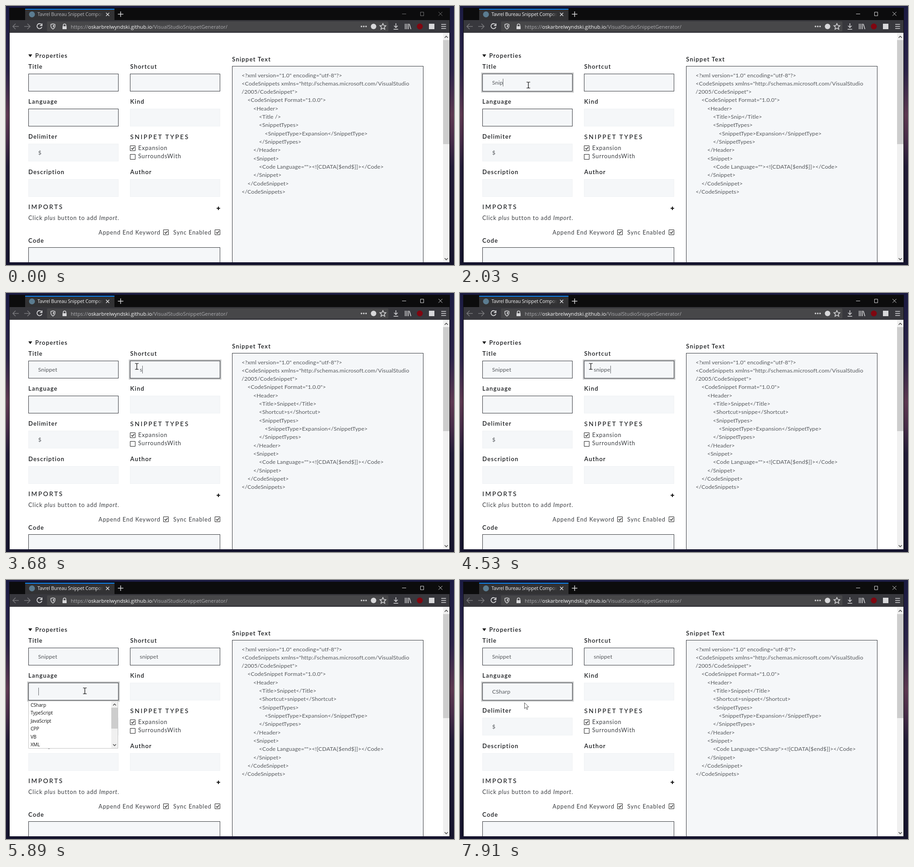
Write an HTML page that moves like this. It is 983 px wide and 570 px high and loops after 7.99 s.

```html
<!DOCTYPE html>
<html lang="en">
<head>
<meta charset="utf-8">
<title>Snippet form</title>
<style>
  html, body { margin: 0; width: 100%; height: 100%; overflow: hidden; background: #14132b; }
  svg { display: block; width: 983px; height: 570px; }
  text { font: 12.35px Lato, sans-serif; letter-spacing: .11px; fill: #55585c; white-space: pre; }
  .label { font-size: 13px; font-weight: 600; letter-spacing: 1.2px; fill: #17191c; }
  .head { font-size: 13.6px; font-weight: 500; letter-spacing: 2.55px; fill: #17191c; }
  .note { font-size: 12.6px; letter-spacing: .88px; fill: #3a3d41; }
  .ui { font: 11.2px "Open Sans", sans-serif; letter-spacing: 0; fill: #adadb0; }
  .tab { font-size: 10.4px; letter-spacing: -.15px; }
  .option { font-size: 10.4px; letter-spacing: -.2px; fill: #111; }
  .icon { fill: none; stroke: #d8d8da; stroke-width: 1.5; }
  .thin { fill: none; stroke: #222; stroke-width: 1; }
</style>
</head>
<body>
<svg viewBox="0 0 983 570">
  <defs>
    <linearGradient id="sky" x2="0" y2="1">
      <stop offset="0" stop-color="#1b1b42"/><stop offset=".25" stop-color="#2a2348"/>
      <stop offset=".42" stop-color="#5c3850"/><stop offset=".52" stop-color="#452b47"/>
      <stop offset=".62" stop-color="#221c37"/><stop offset="1" stop-color="#15142d"/>
    </linearGradient>
    <linearGradient id="tabFade">
      <stop offset="0" stop-color="#323234" stop-opacity="0"/><stop offset="1" stop-color="#323234"/>
    </linearGradient>
    <clipPath id="page"><path d="M8 59H973V564H8Z"/></clipPath>
  </defs>
  <path fill="url(#sky)" d="M0 0H983V570H0Z"/>
  <path fill="#0c0c0d" d="M7 4H974V564H7Z"/>
  <path fill="#323234" d="M42 6H238V31H42Z"/>
  <path fill="#0a84ff" d="M42 6H238V8H42Z"/>
  <path fill="#38383d" d="M8 31H973V59H8Z"/>
  <path fill="#474749" d="M92 34H837Q839 34 839 36V54Q839 56 837 56H92Q90 56 90 54V36Q90 34 92 34Z"/>
  <circle cx="57" cy="18.500" r="6.500" fill="#5b7c90"/>
  <text id="tabTitle" class="ui tab" x="69" y="22">Tavrel Bureau Snippet Composer</text>
  <path fill="url(#tabFade)" d="M198 9H213V30H198Z"/><path fill="#323234" d="M213 9H238V30H213Z"/>
  <path class="icon" d="M219.500 15l7 7m0-7l-7 7M251.500 12v12M245.500 18h12"/>
  <g id="controls" class="icon" style="stroke-width:1">
    <path d="M869 17.500h9M909.500 13.500h7v8h-7zM949 13l8.500 8.500m0-8.500l-8.500 8.500"/>
  </g>
  <path class="icon" style="stroke:#77777b" d="M28 45H15m6-6l-6 6 6 6M40 45h13m-6-6l6 6-6 6"/>
  <path class="icon" style="stroke-width:1.800" d="M78 41a5.500 5.500 0 1 0 .8 5M79 38.500v4.500h-4.500"/>
  <path class="icon" d="M98.500 40.500l4.500-1.300 4.500 1.300v3.500q0 4-4.500 6.800-4.500-2.800-4.500-6.800z"/><path fill="#d8d8da" d="M103 42h2.500v2q0 2-2.500 3.500z"/>
  <path class="icon" d="M125.500 45v-2.500a3 3 0 0 1 6 0v2.500"/><path fill="#d8d8da" d="M124 44.500h9v6.500h-9z"/>
  <text class="ui" x="142" y="49.500">https://<tspan fill="#f9f9fa">oskarbrelwyndski.github.io</tspan>/VisualStudioSnippetGenerator/</text>
  <g fill="#d8d8da"><circle cx="780" cy="45" r="1.700"/><circle cx="785" cy="45" r="1.700"/><circle cx="790" cy="45" r="1.700"/>
    <circle cx="806.500" cy="45" r="6"/><path d="M928 39h12v12h-12z"/></g>
  <path class="icon" d="M827 38.500l2 4.400 4.600.5-3.400 3.200 1 4.700-4.200-2.400-4.200 2.400 1-4.700-3.400-3.200 4.600-.5zM855.500 38v9.500m-4-4l4 4 4-4M850.500 51.200h10"/>
  <path class="icon" d="M876 39v12M879.500 39v12M883 39v12M885 39.500l3.500 11.500M955 40.500h10.500M955 45h10.500M955 49.500h10.500"/>
  <circle cx="908" cy="45" r="6.500" fill="#800610"/>
  <g clip-path="url(#page)">
    <path fill="#fff" d="M8 59H973V564H8Z"/>
    <path fill="#f0f0f0" d="M959 59H973V564H959Z"/><path fill="#cdcdcd" d="M959 75H973V304H959Z"/>
    <path class="thin" style="stroke:#505050;stroke-width:1.600" d="M962.500 70l3.500-3.500 3.500 3.500M962.500 555l3.500 3.500 3.500-3.500"/>
    <path d="M49 106.500h8.500l-4.250 6z" fill="#111"/>
    <g id="form"></g>
    <g id="checks"></g>
    <path d="M465 441.500h2v2.700h2.800v2h-2.800v2.800h-2v-2.800h-2.800v-2h2.800z" fill="#111"/>
    <g id="code"></g>
    <path id="caret" class="thin" style="stroke:#66696d" d="M0 0v17"/>
    <g id="list">
      <path fill="#fff" stroke="#c4c4c4" d="M49.500 266.500h196v104h-196z"/>
      <path fill="#f0f0f0" d="M231 267h14v103h-14z"/><path fill="#cdcdcd" d="M231 281h14v46h-14z"/>
      <path class="thin" style="stroke:#505050;stroke-width:1.600" d="M235 276l3.200-3.200 3.200 3.200M235 361.500l3.200 3.200 3.200-3.200"/>
    </g>
  </g>
  <circle id="click" r="10" fill="#f7e81c" opacity=".75"/>
  <path id="beam" fill="none" stroke="#000" stroke-width="1.200" d="M-4-6.500h2.500Q0-6.500 0-5 0-6.500 1.500-6.500H4M0-5.500v11M-4 6.500h2.500Q0 6.500 0 5 0 6.500 1.500 6.500H4"/>
  <path id="arrow" fill="#fff" stroke="#555" d="M.5.5v13l3-2.800 2.200 4.800 2-.9-2.200-4.700h4.300z"/>
</svg>
<script>
const $ = id => document.getElementById(id);
const LOOP = 7990;

function add(parent, tag, attrs, content = '') {
  const el = document.createElementNS('http://www.w3.org/2000/svg', tag);
  for (const key in attrs) el.setAttribute(key, attrs[key]);
  el.textContent = content;
  return $(parent).appendChild(el);
}
const label = (x, y, content, cls = 'label') => add('form', 'text', { x, y, class: cls }, content);
const show = (el, on) => el.setAttribute('visibility', on ? 'visible' : 'hidden');
const place = (el, x, y) => el.setAttribute('transform', `translate(${x} ${y})`);

function field(x, y, required, w = 198, h = 39) {
  const box = { x: x + .5, y: y + .5, width: w - 1, height: h - 1 };
  const ring = add('form', 'rect', { ...box, fill: 'none', stroke: '#c2c3c4' });
  add('form', 'rect', { ...box, fill: '#f5f7f9', stroke: required ? '#36393e' : '#f0f2f4' });
  return { x: x + 21.5, y, ring, text: label(x + 21.5, y + 23.7, '', '') };
}
function check(x, y, on) {
  add('checks', 'path', { class: 'thin', d: `M${x + .5} ${y + .5}h11v11h-11z` });
  if (on) add('checks', 'path', { class: 'thin', style: 'stroke-width:1.4', d: `M${x + 3} ${y + 6}l2.300 2.500 4.200-5` });
}

[[64, 114, 'Properties'], [49, 138, 'Title'], [272.500, 138, 'Shortcut'], [49, 215, 'Language'],
 [272.500, 215, 'Kind'], [49, 292, 'Delimiter'], [49, 370, 'Description'], [272.500, 370, 'Author'],
 [49, 521, 'Code'], [496, 121.500, 'Snippet Text']].forEach(a => label(...a));
[[272.500, 292.500, 'SNIPPET TYPES'], [49, 446.500, 'IMPORTS']].forEach(a => label(...a, 'head'));
[[290, 316.500, 'Expansion'], [290, 335, 'SurroundsWith'], [203, 502.500, 'Append End Keyword'],
 [367, 502.500, 'Sync Enabled']].forEach(a => label(...a, 'note'));
label(49, 470.500, '', 'note').innerHTML =
  'Click <tspan font-style="italic">plus</tspan> button to add <tspan font-style="italic">Import</tspan>.';
[[272, 307, 1], [272, 326], [345, 492, 1], [458, 492, 1]].forEach(a => check(...a));

const title = field(49, 149, true), shortcut = field(272, 149, true), language = field(49, 226, true);
field(272, 226);
field(49, 303).text.textContent = '$';
field(49, 381);
field(272, 381);
field(49, 531, true, 421, 50);
field(496, 132, true, 420, 450);
['CSharp', 'TypeScript', 'JavaScript', 'CPP', 'VB', 'XML'].forEach((name, i) =>
  add('list', 'text', { x: 54, y: 279 + i * 17.45, class: 'ui option' }, name));
const codeLines = Array.from({ length: 16 }, (_, i) => add('code', 'text', { y: 156.500 + i * 18.33 }));

// Text typed into each field: time of every key press
title.typed = [1570, 1720, 1800, 2030, 2180, 2260, 2410].map((t, i) => [t, 'Snippet'.slice(0, i + 1)]);
shortcut.typed = [3680, 3990, 4070, 4300, 4470, 4530, 4700].map((t, i) => [t, 'snippet'.slice(0, i + 1)]);
language.typed = [[7230, 'CSharp']];
title.focus = [760, 3280];
shortcut.focus = [3280, 5540];
language.focus = [5600, LOOP + 500];
const fields = [title, shortcut, language];
const carets = [[710, 1250, title], [1570, 3220, title], [3300, 5250, shortcut],
  [5560, 6120, language], [6650, 7180, language], [7230, 7640, language]];
const clicks = [[710, 870], [3220, 3380], [5480, 5650], [7160, 7300]];
// Pointer moves: first and last step time, number of steps, end point
const moves = [[70, 540, 7, 150, 174], [2730, 2900, 3, 280, 162], [3040, 3040, 1, 281, 162.500],
  [3220, 3450, 4, 287, 161.500], [5020, 5330, 5, 173, 244], [6600, 6910, 5, 144, 268],
  [7450, 7450, 1, 143, 268], [7600, 7680, 2, 142, 269], [7910, 7910, 1, 141, 269.500]];

const clamp = v => Math.max(0, Math.min(1, v));
const ease = v => v * v * (3 - 2 * v);
const within = t => ([from, to]) => t >= from && t < to;
const valueAt = (list, t) => list.reduce((value, [at, next]) => t >= at ? next : value, '');

function pointer(t) {
  let x = 517, y = 395;
  for (const [from, to, steps, endX, endY] of moves) {
    if (t < from) break;
    const step = steps > 1 ? Math.floor(clamp((t - from) / (to - from)) * (steps - 1) + .01) : 0;
    const k = ease(from === 70 ? step / (steps - 1) : (step + 1) / steps);
    x += (endX - x) * k;
    y += (endY - y) * k;
  }
  return [x, y];
}

function snippet(name, key, lang) {
  return [
    [0, '<?xml version="1.0" encoding="utf-8"?>'],
    [0, '<CodeSnippets xmlns="http://schemas.microsoft.com/VisualStudio'],
    [0, '/2005/CodeSnippet">'],
    [1, '<CodeSnippet Format="1.0.0">'],
    [2, '<Header>'],
    [3, name ? `<Title>${name}</Title>` : '<Title />'],
    key && [3, `<Shortcut>${key}</Shortcut>`],
    [3, '<SnippetTypes>'],
    [4, '<SnippetType>Expansion</SnippetType>'],
    [3, '</SnippetTypes>'],
    [2, '</Header>'],
    [2, '<Snippet>'],
    [3, `<Code Language="${lang}"><![CDATA[$end$]]></Code>`],
    [2, '</Snippet>'],
    [1, '</CodeSnippet>'],
    [0, '</CodeSnippets>'],
  ].filter(Boolean);
}

function draw(t) {
  const active = t >= 710;
  $('tabTitle').style.fill = active ? '#f4f4f5' : '#b6b6b9';
  $('controls').setAttribute('opacity', active ? 1 : .5);

  const values = fields.map(f => valueAt(f.typed, t));
  fields.forEach((f, i) => {
    f.text.textContent = values[i];
    const [from, to] = f.focus;
    const spread = clamp((t - from) / 150) * (1 - clamp((t - to) / 150));
    f.ring.setAttribute('stroke-width', 1 + 5 * spread);
    show(f.ring, spread > 0);
  });
  const lines = snippet(...values);
  codeLines.forEach((el, i) => {
    const [indent, content] = lines[i] || [0, ''];
    el.setAttribute('x', 517 + indent * 12.7);
    el.textContent = content;
  });

  const caret = carets.find(within(t));
  show($('caret'), caret);
  if (caret) {
    const f = caret[2];
    place($('caret'), Math.round(f.x + f.text.getComputedTextLength()) + .5, f.y + 11);
  }
  show($('list'), t >= 5810 && t < 7230);

  const [x, y] = pointer(t), overList = y > 264 && x < 246;
  place($('beam'), x, y);
  place($('arrow'), x, y);
  place($('click'), x - 1, y - 1);
  show($('beam'), t >= 70 && !overList);
  show($('arrow'), t >= 70 && overList);
  show($('click'), clicks.some(within(t)));
}

function tick() {
  draw(performance.now() % LOOP);
  requestAnimationFrame(tick);
}
tick();
</script>
</body>
</html>
```
